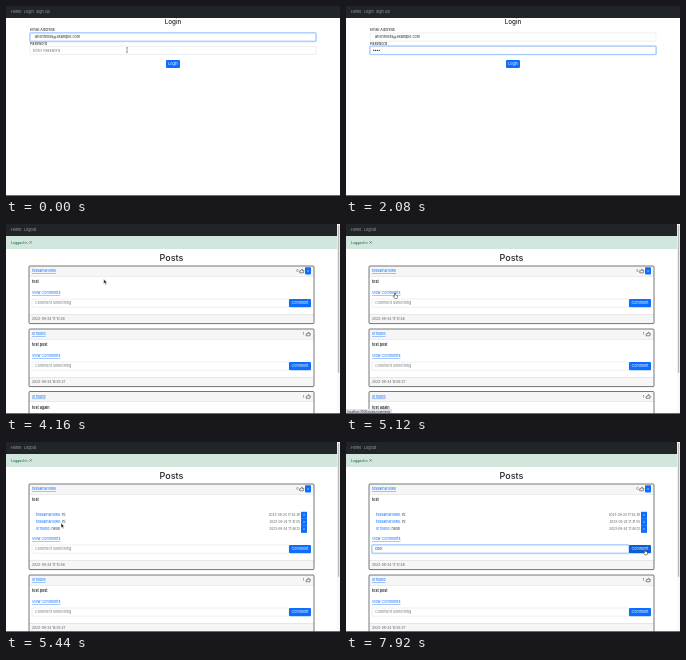
An HTML page for the animation above (8 s loop, 334x190 px).

```html
<!DOCTYPE html>
<html lang="en">
<head>
<meta charset="utf-8">
<title>Login and posts</title>
<style>
html, body { margin: 0; width: 100%; height: 100%; overflow: hidden; background: #fff; }
svg { display: block; width: 100%; height: 100%; }
text { font-family: Inter, "Liberation Sans", sans-serif; font-size: 3.7px; fill: #212529; white-space: pre; }
.title { font-weight: 500; text-anchor: middle; }
.nav { fill: #a2a5a9; }
.link { fill: #0d6efd; text-decoration: underline; }
.name { fill: #0d6efd; }
.hint { fill: #73797f; }
.date { font-size: 3.3px; fill: #565b60; }
.small { font-size: 3.1px; }
.white { fill: #fff; text-anchor: middle; }
.bold { font-weight: 600; }
.end { text-anchor: end; }
</style>
</head>
<body>
<svg id="stage" viewBox="0 0 334 190" preserveAspectRatio="none"></svg>
<script>
const LOOP = 8000;
const BLUE = '#0d6efd';
const GROW = 28;

const rect = (x, y, w, h, fill, extra = '') =>
  `<rect x="${x}" y="${y}" width="${w}" height="${h}" fill="${fill}" ${extra}/>`;
const text = (x, y, str, cls = '', extra = '') =>
  `<text x="${x}" y="${y}" class="${cls}" ${extra}>${str}</text>`;
const group = (id, body, extra = '') => `<g id="${id}" ${extra}>${body}</g>`;
const field = (x, y, w) => rect(x, y, w, 8.2, '#fff', 'rx="1" stroke="#ced4da" stroke-width=".4"');
const ring = (id, x, y, w) => group(id,
  rect(x - .3, y - .3, w + .6, 8.8, 'none', 'rx="1.2" stroke="#c2dbff" stroke-width="1.3"') +
  rect(x, y, w, 8.2, 'none', 'rx="1" stroke="#86b7fe" stroke-width=".5"'));
const button = (x, y, w, h, label, id = '') =>
  rect(x, y, w, h, BLUE, `rx="1" id="${id}"`) + text(x + w / 2, y + h / 2 + 1.3, label, 'white');
const navbar = labels => rect(0, 0, 334, 12, '#212529') +
  labels.map(([x, str]) => text(x, 7.4, str, 'nav')).join('');
const likes = (x, y, count) => text(x, y + 1.2, count, 'small') +
  `<path d="M${x + 3.2} ${y - .2}h1.2l1-1.8q1 0 .5 1.5h1.5l-.5 2.3h-3.7z" fill="none" stroke="#212529" stroke-width=".5"/>`;

const login = navbar([[5, 'Home'], [18, 'Login'], [30, 'Sign Up']]) +
  text(167, 18.4, 'Login', 'title', 'style="font-size:6.3px"') +
  text(24, 25.2, 'Email Address') + field(24, 27, 286) + ring('emailRing', 24, 27, 286) +
  text(29, 32.2, 'arlenmoss@example.com') +
  text(24, 38.9, 'Password') + field(24, 40.2, 286) + ring('passRing', 24, 40.2, 286) +
  text(27, 45.6, 'Enter Password', 'hint', 'id="passHint"') +
  [0, 1, 2, 3, 4].map(i => `<circle class="dot" cx="${27.8 + i * 1.8}" cy="44.4" r=".6" fill="#212529"/>`).join('') +
  button(160, 54, 14, 8, 'Login');

const cardTop = (y, author, body, side) =>
  rect(23, y, 285, 10, '#f6f6f6') + rect(23, y + 10, 285, .4, '#cfcfcf') +
  text(26, y + 6.2, author, 'link') + side + text(26, y + 17.2, body, 'bold');

const cardBottom = (y, label, date, id) =>
  text(26, y + 28.4, label, 'link') + field(26, y + 33, 257) +
  (id ? ring('commentRing', 26, y + 33, 257) : '') +
  text(29, y + 38.4, 'Comment something', 'hint', `id="${id}Hint"`) +
  button(283, y + 33, 22, 8.2, 'Comment', id + 'Button') +
  rect(23, y + 48, 285, 10, '#f6f6f6') + rect(23, y + 48, 285, .4, '#cfcfcf') +
  text(26, y + 54.2, date, 'date');

const frame = (y, id = '') =>
  rect(23, y, 285, 57.6, 'none', `id="${id}" rx="1" stroke="#2c3034" stroke-width=".65"`);

const comments = [['tessamarlowe', 'hi', '17:24:38'], ['tessamarlowe', 'hi', '17:31:05'], ['ormund', 'hello', '17:46:12']]
  .map(([who, what, at], i) => {
    const y = 73 + i * 7;
    return text(30, y + 1.3, `<tspan class="name">${who}:</tspan> ${what}`) +
      text(294, y + 1.2, '2023-09-24 ' + at, 'date small end') +
      rect(295, y - 3.2, 6, 7.05, BLUE) + text(298, y + 1.2, 'x', 'white small');
  }).join('');

const posts = rect(0, 0, 334, 190, '#fff') + navbar([[5, 'Home'], [18, 'Logout']]) +
  rect(0, 12, 331, 13, '#d1e7dd') + text(5, 19.9, 'Logged in', '', 'style="fill:#0f5132;font-size:3.5px"') +
  '<path d="M23.4 17.2l2.4 2.4m0-2.4l-2.4 2.4" stroke="#53645c" stroke-width=".6"/>' +
  text(165.5, 37.4, 'Posts', 'title', 'style="font-size:9px"') +
  cardTop(42, 'tessamarlowe', 'test', likes(290.5, 47, '0') + rect(299, 43.2, 6, 7.2, BLUE, 'rx=".8"') + text(302, 48, 'x', 'white small')) +
  group('comments', comments, 'clip-path="url(#reveal)"') +
  group('lower', cardBottom(42, 'View Comments', '2023-09-24 17:10:46', 'comment') +
    cardTop(105, 'ormund', 'test post', likes(297, 110, '1')) +
    cardBottom(105, 'View Comments', '2023-09-24 16:55:27', '') + frame(105) +
    cardTop(167.5, 'ormund', 'test again', likes(297, 172.5, '1')) + frame(167.5)) +
  frame(42, 'firstFrame') +
  text(29, 108.4, '', '', 'id="typed"') +
  group('menu', rect(48, 113, 42, 50, '#202225', 'rx="1"') +
    ['hi', 'comment', 'cheers', 'arlenmoss@example', 'test', 'cool'].map((str, i) =>
      text(51, 119.2 + i * 7.8, str, 'small', 'style="fill:#e6e6e6"')).join('')) +
  rect(331, 0, 3, 190, '#f8f8f8') + rect(331.8, 1, 1.5, 148, '#bcbcbc', 'rx=".7" id="thumb"') +
  group('status', rect(0, 185, 46, 5, '#dfe2e6') + text(1.5, 188.6, 'localhost:3000/posts/comments', 'small', 'style="font-size:2.8px"'));

const cursor = group('mouse',
  '<path id="arrow" d="M0 0v4.6l1.1-1 .8 1.8.8-.4-.8-1.7h1.5z" fill="#111" stroke="#fff" stroke-width=".4"/>' +
  '<path id="beam" d="M-.8-2.3h1.6M0-2.3v4.6M-.8 2.3h1.6" fill="none" stroke="#444" stroke-width=".5"/>' +
  '<path id="hand" d="M-.5-.6q.5-.6 1 0v2l2 .5v1.6l-.5 1.4h-2.2l-1.6-2 .3-.6 1 .5z" fill="#fff" stroke="#111" stroke-width=".45"/>');

const stage = document.getElementById('stage');
stage.innerHTML =
  '<clipPath id="reveal"><rect id="revealBox" x="23" y="64" width="285" height="0"/></clipPath>' +
  group('login', login) + group('posts', posts) +
  rect(0, 189.2, 334, .8, '#45484b') + cursor;

const part = {};
stage.querySelectorAll('[id]').forEach(el => { if (el.id) part[el.id] = el; });
const dots = [...stage.querySelectorAll('.dot')];

const dotTimes = [880, 1280, 1920, 2080, 2560];
const keyTimes = [6160, 6320, 6480, 6720];
// time, x, y
const path = [
  [0, 121, 44], [3840, 121, 44], [4240, 92, 58], [4800, 49, 69], [5360, 49, 70],
  [5440, 55, 81], [5600, 65, 106.5], [7200, 65, 106.5], [7440, 150, 116], [7760, 299, 108]
];

const progress = (t, a, b) => Math.min(1, Math.max(0, (t - a) / (b - a)));
const ease = p => p * p * (3 - 2 * p);
const show = (el, on) => { el.style.display = on ? '' : 'none'; };
const fade = (el, amount) => { el.style.opacity = amount; };
const within = (t, a, b) => t >= a && t < b;
const count = (times, t) => times.filter(at => at <= t).length;

function mouseAt(t) {
  const i = path.findIndex(([at]) => at > t);
  if (i < 0) return path[path.length - 1].slice(1);
  const [t0, x0, y0] = path[i - 1], [t1, x1, y1] = path[i];
  const p = progress(t, t0, t1);
  return [x0 + (x1 - x0) * p, y0 + (y1 - y0) * p];
}

function render(t) {
  show(part.login, t < 3040);
  show(part.posts, t >= 3040);

  const swap = ease(progress(t, 80, 400));
  fade(part.emailRing, 1 - swap);
  fade(part.passRing, swap);
  const hidden = count(dotTimes, t);
  show(part.passHint, !hidden);
  dots.forEach((dot, i) => show(dot, i < hidden));

  const grow = GROW * ease(progress(t, 5160, 5420));
  part.lower.setAttribute('transform', `translate(0 ${grow})`);
  part.revealBox.setAttribute('height', grow);
  part.firstFrame.setAttribute('height', 57.6 + grow);
  part.thumb.setAttribute('height', 148 - grow / 2);
  show(part.status, within(t, 4880, 5400));

  fade(part.commentRing, ease(progress(t, 5840, 6000)));
  const keys = count(keyTimes, t);
  part.typed.textContent = 'cool'.slice(0, keys);
  show(part.commentHint, !keys);
  show(part.menu, within(t, 6160, 7040));
  part.commentButton.setAttribute('fill', t >= 7700 ? '#0b5ed7' : BLUE);

  const [x, y] = mouseAt(t);
  part.mouse.setAttribute('transform', `translate(${x} ${y})`);
  show(part.mouse, t < 880 || within(t, 3840, 6160) || t >= 7040);
  const beam = t < 880 || within(t, 5560, 7280);
  const hand = within(t, 4800, 5400) || t >= 7700;
  show(part.beam, beam);
  show(part.hand, hand);
  show(part.arrow, !beam && !hand);
}

const start = performance.now();
function tick() {
  render((performance.now() - start) % LOOP);
  requestAnimationFrame(tick);
}
render(0);
requestAnimationFrame(tick);
</script>
</body>
</html>
```
